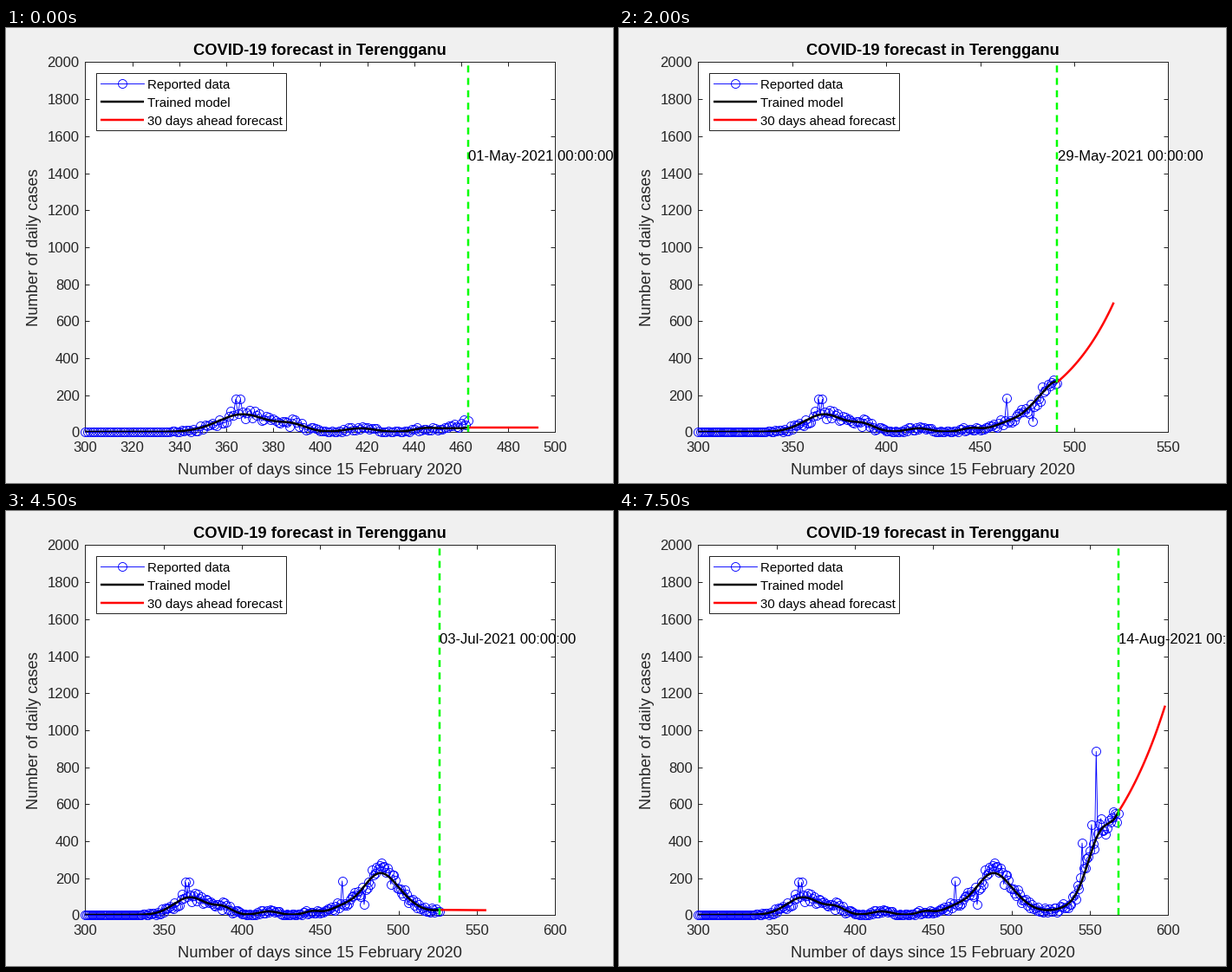
A matplotlib script that plays this animation: 700 by 525 pixels, repeating every 8000 ms.

```python
import numpy as np
import matplotlib.pyplot as plt
from matplotlib.animation import FuncAnimation
from matplotlib.patches import Rectangle

W, H, DPI = 700, 525, 100
PX = 72 / DPI  # points per pixel
LEFT, RIGHT, TOP, BOTTOM = 91.4, 633.4, 39.4, 466.4
INK = "#262626"
FIRST_DAY, FIRST_CUT, STEP, AHEAD, WEEKS = 300, 463, 7, 30, 16

plt.rcParams["font.family"] = "Liberation Sans"

# Waves of infection: peak day, height, width
WAVES = [(367, 95, 10.5), (388, 36, 6), (417, 19, 6), (445, 19, 5),
         (464, 38, 8), (487, 205, 10.5), (502, 52, 10), (556, 245, 8)]
# Days that stand far out of the noise
OUTLIERS = {364: 178, 366: 178, 464: 185, 478: 58, 489: 283, 545: 390,
            551: 490, 554: 885}


def trend(day):
    level = 2 + 45 * np.exp((day - 535) / 14)
    for peak, height, width in WAVES:
        level = level + height * np.exp(-0.5 * ((day - peak) / width) ** 2)
    return level


def fit_error(week):
    """How far the end of the fit is from the trend known later."""
    return np.interp(week, [0, 1, 2, 4, 6], [-28, -20, -32, 48, 0])


def log_growth(week):
    """Logarithm of the growth over the days ahead."""
    return np.interp(week, [0, 2, 4, 6, 8, 11, 13, 15],
                     [0, 0.56, 0.95, -0.2, -0.13, 0.06, 1.27, 0.71])


days = np.arange(FIRST_DAY, FIRST_CUT + STEP * (WEEKS - 1) + 1)
level = trend(days)
spread = 0.8 + 3 * np.sqrt(np.clip(level - 3, 0, None))
rng = np.random.default_rng(19)
cases = np.abs(level + spread * rng.uniform(-1, 1, days.size))
for day, count in OUTLIERS.items():
    cases[day - FIRST_DAY] = count

fig = plt.figure(figsize=(W / DPI, H / DPI), dpi=DPI, facecolor="#f0f0f0")
ax = fig.add_axes([LEFT / W, 1 - BOTTOM / H,
                   (RIGHT - LEFT) / W, (BOTTOM - TOP) / H])
ax.set_ylim(0, 2000)
ax.set_yticks(range(0, 2001, 200))
ax.tick_params(direction="in", top=True, right=True, length=5.4 * PX,
               width=PX, color=INK, labelcolor=INK, labelsize=16.67 * PX)
ax.tick_params(axis="x", pad=10.5 * PX)
ax.tick_params(axis="y", pad=6.9 * PX)
for spine in ax.spines.values():
    spine.set(color=INK, linewidth=PX)

# Overlay in pixels, y pointing down
stage = fig.add_axes([0, 0, 1, 1], zorder=5)
stage.set(xlim=(0, W), ylim=(H, 0))
stage.axis("off")

REPORTED = dict(color="#0000ff", lw=0.9 * PX, marker="o", ms=10 * PX,
                mfc="none", mew=0.9 * PX)
MODEL = dict(color="black", lw=2.5 * PX, solid_capstyle="butt")
FORECAST = dict(MODEL, color="red")


def label(x, y, text, size, **kw):
    return stage.text(x, y, text, fontsize=size * PX, va="baseline", **kw)


label(362.25, 31, "COVID-19 forecast in Terengganu", 18.33, ha="center",
      weight="bold")
label(362.25, 515, "Number of days since 15 February 2020", 18.33,
      ha="center", color=INK)
label(37, 253.3, "Number of daily cases", 18.33, ha="center", color=INK,
      rotation=90, rotation_mode="anchor")

stage.add_patch(Rectangle((104, 52), 219, 66, fc="white", ec=INK, lw=PX))
entries = [("Reported data", REPORTED), ("Trained model", MODEL),
           ("30 days ahead forecast", FORECAST)]
for row, (text, style) in enumerate(entries):
    y = 64.3 + 20.7 * row
    stage.plot([109, 134, 159], [y] * 3, markevery=[1], **style)
    label(163, y + 6, text, 15)

reported, = ax.plot([], [], zorder=3, clip_on=False, **REPORTED)
model, = ax.plot([], [], zorder=4, **MODEL)
forecast, = ax.plot([], [], zorder=4, **FORECAST)
cut_line, = ax.plot([], [], color="lime", lw=2.5 * PX, zorder=5,
                    dashes=(3.2, 2.52), dash_capstyle="butt")
stamp = label(0, 153, "", 16.67)


def date_text(week):
    day = np.datetime64("2021-05-01") + STEP * week
    year, month, date = str(day).split("-")
    name = ["May", "Jun", "Jul", "Aug"][int(month) - 5]
    return f"{date}-{name}-{year} 00:00:00"


def draw(week):
    cut = FIRST_CUT + STEP * week
    end = int(np.ceil((cut + AHEAD) / 50)) * 50
    ax.set_xlim(FIRST_DAY, end)
    ax.set_xticks(range(FIRST_DAY, end + 1, 20 if end <= 500 else 50))

    n = cut - FIRST_DAY + 1
    seen = days[:n]
    fit = level[:n] + fit_error(week) * np.exp(-((cut - seen) / 6) ** 2)
    ahead = np.arange(AHEAD + 1)

    reported.set_data(seen, cases[:n])
    model.set_data(seen, fit)
    forecast.set_data(cut + ahead,
                      fit[-1] * np.exp(log_growth(week) * ahead / AHEAD))
    cut_line.set_data([cut, cut], [0, 2000])
    share = (cut - FIRST_DAY) / (end - FIRST_DAY)
    stamp.set_x(LEFT + (RIGHT - LEFT) * share + 0.3)
    stamp.set_text(date_text(week))
    return reported, model, forecast, cut_line, stamp


anim = FuncAnimation(fig, draw, frames=WEEKS, interval=500, repeat=True)
plt.show()
```
